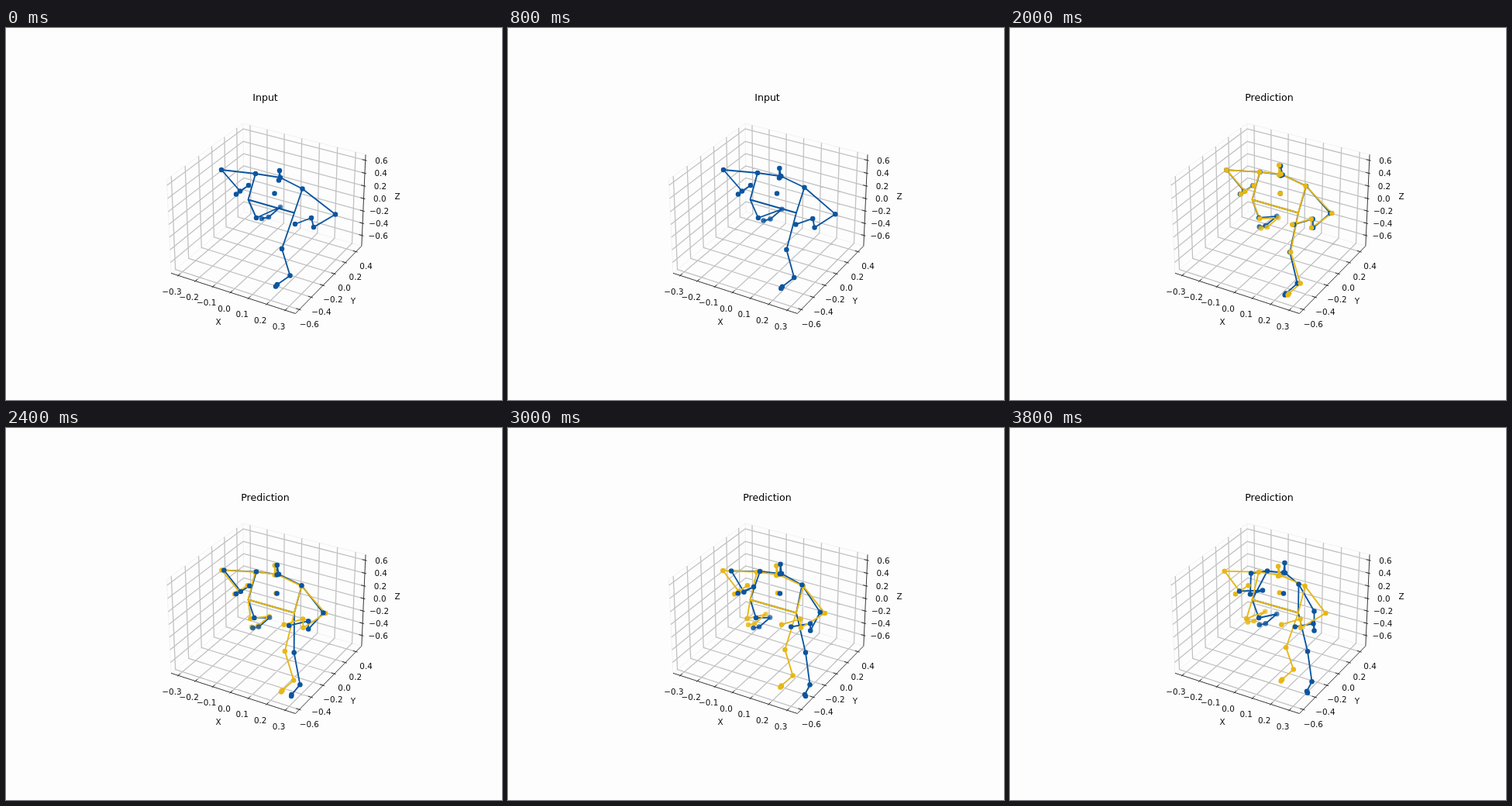
Write an HTML page that moves like this. It is 640 px wide and 480 px high and loops after 4 s.

```html
<!DOCTYPE html>
<html lang="en">
<head>
<meta charset="utf-8">
<title>Pose prediction</title>
<style>
  html, body { margin: 0; width: 100%; height: 100%; overflow: hidden; background: #fdfdfd; }
  svg { display: block; width: 640px; height: 480px; }
  text { font: 10.4px "DejaVu Sans", sans-serif; text-anchor: middle; fill: #111; }
  #title { font-size: 12.6px; fill: #000; }
  path { fill: none; }
</style>
</head>
<body>
<svg viewBox="0 0 640 480">
  <g id="axes"></g>
  <text id="title" x="334.5" y="94.2"></text>
  <g id="pose"></g>
</svg>
<script>
const STEP = 200, STEPS = 20, LAST = STEPS - 1, PREDICT = 10;
const BLUE = '#0b559f', YELLOW = '#e7b717';
const $ = id => document.getElementById(id);
const line = pts => 'M' + pts.map(p => p.map(n => n.toFixed(2))).join('L');
const path = (d, color, width) => `<path d="${d}" stroke="${color}" stroke-width="${width}" stroke-linejoin="round"/>`;
const label = (x, y, s) => `<text x="${x}" y="${y + 3.8}">${s}</text>`;

// Perspective view of the plot box; a, b, c run from 0 to 1 along X, Y, Z.
function project(a, b, c) {
  const x = (a - 0.5) * 1.1429, y = (b - 0.5) * 1.1429, z = (c - 0.5) * 0.8571;
  const s = 1608 / (10 - 0.433 * x + 0.75 * y - 0.5 * z);
  return [338.1 + s * (0.866 * x + 0.5 * y),
          240.1 - s * (-0.25 * x + 0.433 * y + 0.866 * z)];
}

function drawAxes() {
  const seg = (...pts) => line(pts.map(p => project(...p)));
  // Each axis: tick range, its place in the box, label offset, grid bend, tick stub.
  const axes = [
    { from: -0.3, gap: 0.1, n: 7, lo: 0.06, hi: 0.922, dx: -8.2, dy: 20.8,
      grid: t => [[t, 0, 0], [t, 1, 0], [t, 1, 1]], stub: (t, e) => [t, e, 0] },
    { from: -0.6, gap: 0.2, n: 6, lo: 0.055, hi: 0.91, dx: 12.9, dy: 18.5,
      grid: t => [[1, t, 0], [0, t, 0], [0, t, 1]], stub: (t, e) => [1 - e, t, 0] },
    { from: -0.6, gap: 0.2, n: 7, lo: 0.12, hi: 0.94, dx: 20.7, dy: 0.3,
      grid: t => [[0, 0, t], [0, 1, t], [1, 1, t]], stub: (t, e) => [1 - e, 1, t] }
  ];
  const edges = seg([0, 0, 1], [0, 1, 1], [1, 1, 1]) + seg([0, 1, 1], [0, 1, 0])
    + seg([0, 0, 1], [0, 0, 0], [0, 1, 0], [1, 1, 0]);
  let grid = '', ticks = '', names = '';
  for (const ax of axes) {
    for (let i = 0; i < ax.n; i++) {
      const t = ax.lo + (ax.hi - ax.lo) * i / (ax.n - 1);
      const v = Math.round((ax.from + i * ax.gap) * 10) / 10;
      const [x, y] = project(...ax.stub(t, 0));
      grid += seg(...ax.grid(t));
      ticks += seg(ax.stub(t, -0.012), ax.stub(t, 0.025));
      names += label(x + ax.dx, y + ax.dy, (v < 0 ? '−' : '') + Math.abs(v).toFixed(1));
    }
  }
  const frame = seg([0, 0, 0], [1, 0, 0], [1, 1, 0], [1, 1, 1]);
  $('axes').innerHTML = path(edges, '#f1f1f1', 1) + path(grid, '#c2c2c2', 1.3)
    + path(frame + ticks, '#222', 0.9) + names
    + label(274, 379, 'X') + label(448, 352, 'Y') + label(505, 217, 'Z');
}

// Motion curves over the steps.
const power = p => k => (k / LAST) ** p;
const wave = (span, p) => k => Math.sin(Math.PI * k / span) ** p;
const rise = power(0.8), lean = power(1.6), lift = power(5);
const sway = wave(17, 1), dip = wave(27, 2), tuck = wave(29, 4);
const still = () => 0;
function swing(k) {
  const t = Math.min(1, Math.max(0, (k - 9) / 6));
  return 0.12 * Math.min(1, k / 2) + 0.88 * t * t * (3 - 2 * t);
}

// Joints are [x, y, reach x, reach y]; a part's curves scale the reach.
// The guess starts off by `bias` and wanders away by `drift`.
const PARTS = [
  { x: lift, y: lift, bias: [0, 0], drift: [-2.5, 1.5], joints: { elbowL: [278, 183, 33, 4.5] } },
  { x: lift, y: lift, bias: [1, 0], drift: [-7, 0], joints: {
    wristL: [302, 210.5, 8, 4], handL: [313, 203, 13, 6.5], tipL: [297, 214.5, -1, -4] } },
  { x: lift, y: rise, bias: [-0.5, 0], drift: [-1, 0], joints: {
    shoulderL: [322, 188, 10, -3.5], shoulderR: [382.5, 207.5, -10, -6] } },
  { x: sway, y: rise, bias: [-2, -1], drift: [-1, 1.5], joints: {
    head: [353, 184, -4, -10], neck: [354, 193, -2.5, -6], nose: [352, 196.5, -3, -10] } },
  { x: lean, y: lean, bias: [2, 0], drift: [-8, 0], joints: { elbowR: [425, 240.5, -32.5, -4] } },
  { x: dip, y: swing, bias: [-2, 0], drift: [-14, 0], joints: {
    wristR: [397, 257, -7, 4.5], handR: [394, 245, -4, 7.5], tipR: [373, 253, -8, 3.5] } },
  { x: lean, y: still, bias: [0, 0], drift: [-1, -1], joints: { chest: [346.5, 213.5, 6.5, 0] } },
  { x: tuck, y: still, bias: [1, 1], drift: [-17, 0], joints: { kneeL: [323, 245, -3, 0] } },
  { x: tuck, y: dip, bias: [2, 2], drift: [-17, -8], joints: {
    ankleL: [354, 231, -16, 14], footL: [339, 244, -15, 13], toeL: [330, 246, -13.5, 12.5] } },
  { x: swing, y: dip, bias: [1, 0], drift: [-6, -6], joints: { kneeR: [356, 285, 28, 5] } },
  { x: swing, y: dip, bias: [4, 0], drift: [-9, -18], joints: {
    ankleR: [366.5, 319.5, 23, 12], footR: [350, 331, 33, 13.5], toeR: [348, 333.5, 36, 13] } }
];
const HIPS = { hipL: [312.5, 221.5], hipR: [372, 238.5] };
const BONES = [
  'tipL handL wristL elbowL shoulderL neck shoulderR elbowR wristR handR tipR',
  'neck head nose', 'hipL hipR',
  'shoulderL hipL kneeL ankleL footL toeL',
  'shoulderR hipR kneeR ankleR footR toeR'
].map(chain => chain.split(' '));
const FADE = { ankleL: 0.72, footL: 0.82, toeL: 0.85 };

function poseAt(k, guessing) {
  const u = (k - PREDICT) / (LAST - PREDICT), from = guessing ? PREDICT : k;
  const pose = {};
  for (const { x, y, bias, drift, joints } of PARTS) {
    const off = guessing ? [bias[0] + drift[0] * u * (2 - u), bias[1] + drift[1] * u] : [0, 0];
    for (const [name, [px, py, rx, ry]] of Object.entries(joints))
      pose[name] = [px + rx * x(from) + off[0], py + ry * y(from) + off[1]];
  }
  return pose;
}

const bones = (pose, color) => {
  const all = { ...pose, ...HIPS };
  return path(BONES.map(chain => line(chain.map(name => all[name]))).join(''), color, 1.85);
};
const dots = (pose, color) => Object.entries(pose).map(([name, [x, y]]) =>
  `<circle cx="${x}" cy="${y}" r="3.25" fill="${color}" opacity="${FADE[name] || 1}"/>`).join('');

function draw(k) {
  const real = poseAt(k, false);
  let lines = bones(real, BLUE), marks = dots(real, BLUE);
  if (k >= PREDICT) {
    const guess = poseAt(k, true), guessDots = dots(guess, YELLOW);
    lines += bones(guess, YELLOW);
    marks = k < PREDICT + 2 ? marks + guessDots : guessDots + marks;
  }
  $('title').textContent = k < PREDICT ? 'Input' : 'Prediction';
  $('pose').innerHTML = lines + marks;
}

const start = performance.now();
let shown = -1;
function tick() {
  const k = Math.floor((performance.now() - start) / STEP) % STEPS;
  if (k !== shown) draw(shown = k);
  requestAnimationFrame(tick);
}
drawAxes();
tick();
</script>
</body>
</html>
```
